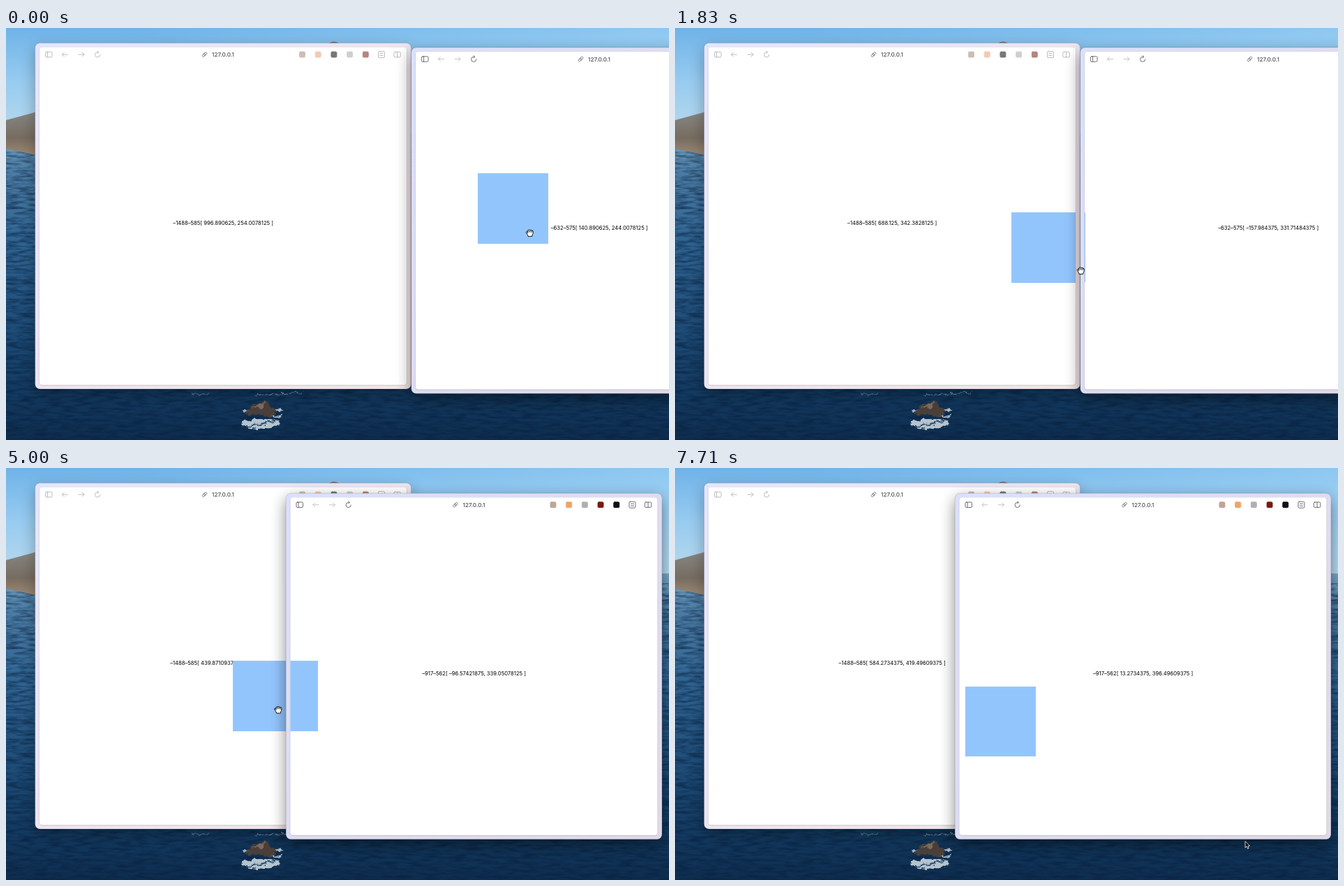
Write an HTML page that moves like this. It is 950 by 590 pixels and loops after 7.77 s.

```html
<!DOCTYPE html>
<html lang="en">
<head>
<meta charset="utf-8">
<title>One square, two windows</title>
<style>
  html, body { margin: 0; width: 100%; height: 100%; overflow: hidden; background: #0f2f52; }
  .stage { position: absolute; left: 0; top: 0; width: 950px; height: 590px; display: block; }
  #backdrop { will-change: transform; }
  text { font-family: Inter, "Open Sans", sans-serif; white-space: pre; }
  .readout { font-size: 7.65px; fill: #000; text-anchor: middle; }
  .address { font-size: 8.2px; font-weight: 500; fill: #505050; text-anchor: middle; }
  .icon { fill: none; stroke-width: .85; stroke-linecap: round; stroke-linejoin: round; }
  .square { fill: #93c5fd; shape-rendering: crispEdges; }
</style>
</head>
<body>
<svg id="backdrop" class="stage" viewBox="0 0 950 590">
  <defs>
    <linearGradient id="sky" x2="0" y2="1">
      <stop offset="0" stop-color="#6fb3e8"/>
      <stop offset=".5" stop-color="#97cbf0"/>
      <stop offset="1" stop-color="#b8d9ec"/>
    </linearGradient>
    <linearGradient id="haze">
      <stop offset=".2" stop-color="#b4e0fa" stop-opacity="0"/>
      <stop offset="1" stop-color="#b4e0fa" stop-opacity=".45"/>
    </linearGradient>
    <linearGradient id="sea" x2="0" y2="1">
      <stop offset="0" stop-color="#78a8c6"/>
      <stop offset=".12" stop-color="#4d7da5"/>
      <stop offset=".35" stop-color="#2f6492"/>
      <stop offset=".65" stop-color="#1d4b76"/>
      <stop offset=".85" stop-color="#133a60"/>
      <stop offset="1" stop-color="#0e2d4e"/>
    </linearGradient>
    <linearGradient id="cliff" x2="0" y2="1">
      <stop offset="0" stop-color="#858683"/>
      <stop offset=".6" stop-color="#776c60"/>
      <stop offset="1" stop-color="#9b8873"/>
    </linearGradient>
    <filter id="ripple" x="0" y="0" width="1" height="1" color-interpolation-filters="sRGB">
      <feTurbulence type="fractalNoise" baseFrequency=".05 .25" numOctaves="3" seed="7"/>
      <feColorMatrix values="0 0 0 0 .03  0 0 0 0 .12  0 0 0 0 .24  2 0 0 0 -.75"/>
    </filter>
    <filter id="rough" color-interpolation-filters="sRGB">
      <feTurbulence type="fractalNoise" baseFrequency=".15" numOctaves="3" seed="3"/>
      <feDisplacementMap in="SourceGraphic" scale="9" xChannelSelector="R" yChannelSelector="G"/>
    </filter>
  </defs>
  <rect width="950" height="152" fill="url(#sky)"/>
  <rect width="950" height="152" fill="url(#haze)"/>
  <path d="M462 22Q470 17 478 22Z" fill="#7d6a60"/>
  <rect y="151" width="950" height="439" fill="url(#sea)"/>
  <rect y="165" width="950" height="425" filter="url(#ripple)" opacity=".7"/>
  <path d="M0 132L44 120V182L0 173Z" fill="url(#cliff)"/>
  <g filter="url(#rough)">
    <path d="M267 524H290M355 526L425 522" fill="none" stroke="#b9ccd8" opacity=".6"/>
    <path d="M340 547L394 556M380 548L396 546" fill="none" stroke="#aebfca" stroke-width="2"/>
    <ellipse cx="365" cy="567" rx="27" ry="7" fill="#d3dee5" opacity=".85"/>
    <path d="M344 553L352 540L371 534L390 550L378 556Z" fill="#4b4039"/>
    <path d="M354 543L371 536L366 546Z" fill="#7d6c60"/>
    <path d="M344 571L384 563" fill="none" stroke="#2a4b68" stroke-width="2"/>
  </g>
</svg>

<svg id="scene" class="stage" viewBox="0 0 950 590">
  <defs>
    <linearGradient id="paleFrame" x2="1" y2="1">
      <stop offset="0" stop-color="#e5e5fb"/>
      <stop offset="1" stop-color="#f3e4e4"/>
    </linearGradient>
    <linearGradient id="blueFrame" x2="1" y2="1">
      <stop offset="0" stop-color="#dce0fb"/>
      <stop offset="1" stop-color="#e0d8e6"/>
    </linearGradient>
    <filter id="shadow" x="-20%" y="-20%" width="140%" height="140%">
      <feGaussianBlur stdDeviation="11"/>
    </filter>
  </defs>
  <g id="windows"></g>
  <path id="arrow" d="M0 0V9.2L2.1 7.3L3.6 10.6L5.2 9.9L3.8 6.7H6.5Z" fill="#000" stroke="#fff" stroke-width=".8"/>
  <g id="hand" stroke="#000" stroke-width=".9" stroke-linejoin="round" stroke-linecap="round">
    <path fill="#fff" d="M-5 -1Q-4.5 -3 -3 -2V-3.5Q-2 -5 -1 -3.8Q0 -5.4 1.2 -3.8Q2.4 -4.8 3.2 -3.2Q5 -3.5 5 -2Q5 1.5 3.5 3.5V5H-2.5V3.8Q-4.5 1.5 -5 -1Z"/>
    <path fill="none" d="M-3 -2V.3M-1 -3.8V-1.2M1.2 -3.8V-1.2M3.2 -3.2V-1"/>
  </g>
</svg>

<script>
const LOOP = 7770;
const TICK = 41.5;
const SCALE = 0.63;     // page pixels to stage pixels
const SIZE = 160 * SCALE;
const LEFT = { x: 48, y: 27.5 };
const RIGHT = { x: 587, y: 34 };
const BAR = 20.6;

const line = (d, color) => `<path class="icon" d="${d}" stroke="${color}"/>`;
const box = (x, w, h, color, fill = 'none') =>
  `<rect class="icon" x="${x - w / 2}" y="${10.5 - h / 2}" width="${w}" height="${h}" rx="1.5" stroke="${color}" style="fill:${fill}"/>`;
const splitBox = (x, bar, color) => box(x, 9.5, 7.5, color) + line(`M${bar} 7v7`, color);
const pill = angle =>
  `<rect class="icon" x="-2.6" y="-1.6" width="5.2" height="3.2" rx="1.6" stroke="#777" transform="translate(236.5 10.5) rotate(${angle}) translate(1.4 0)"/>`;

function toolbar(main, faint, badges) {
  return splitBox(13.3, 11.6, main)
    + line('M40.5 10.5h-8m3 -3l-3 3l3 3', faint)
    + line('M56 10.5h8m-3 -3l3 3l-3 3', faint)
    + line('M86.8 10.8A3.6 3.6 0 1 1 83.2 7.2H84.5m-1.4 -1.7l1.7 1.7l-1.7 1.7', main)
    + pill(-45) + pill(135)
    + '<text class="address" x="263" y="13.5">127.0.0.1</text>'
    + badges.map((color, i) => box(376.5 + 22.7 * i, 8, 8, color, color)).join('')
    + box(490, 9, 9, main) + line('M487.8 9h4.4m-4.4 3h4.4', main)
    + splitBox(512.6, 512.6, main);
}

function browserWindow(name, frame, shade, bar) {
  return `<g id="${name}">
    <rect x="-6" y="2" width="538" height="495" rx="8" opacity="${shade}" filter="url(#shadow)"/>
    <rect x="-6.3" y="-6" width="538.8" height="495.5" rx="7" fill="url(#${frame})" stroke="#000" stroke-opacity=".2" stroke-width=".6"/>
    <rect x="-.7" y="-.3" width="527.4" height="485" rx="4.5" opacity=".1"/>
    <rect width="526" height="483.6" rx="4" fill="#fff"/>
    ${bar}
    <svg y="${BAR}" width="526" height="463" overflow="hidden">
      <text class="readout" x="263.2" y="234.3"></text>
      <rect class="square" width="${SIZE}" height="${SIZE}"/>
    </svg>
  </g>`;
}

const dimBar = toolbar('#b2b2b2', '#b2b2b2', ['#cdbcb8', '#f5c9b4', '#777', '#cfcfcf', '#b5857d']);
const litBar = toolbar('#555', '#bcbcbc', ['#c0a497', '#f3a266', '#b0b0b0', '#7c1712', '#111']);

document.getElementById('windows').innerHTML =
  browserWindow('left', 'paleFrame', .3, dimBar) + browserWindow('right', 'blueFrame', .48, litBar);

const ease = u => (1 - Math.cos(Math.PI * Math.min(1, Math.max(0, u)))) / 2;
const mix = (a, b, u) => a.map((v, i) => v + (b[i] - v) * u);
const between = (tick, from, to) => tick >= from && tick <= to;

// Where the dragged square turns round, in page pixels of the right window.
const turns = [
  { at: 0, pos: [140.890625, 244.0078125] },
  { at: 17, pos: [-98.859375, 258.640625] },
  { at: 28, pos: [-380, 310] },
  { at: 43, pos: [-167.875, 332.3828125] },
  { at: 52, pos: [160.18359375, 310.23828125] },
  { at: 104, pos: [160.18359375, 310.23828125] },
  { at: 116, pos: [-180, 340] },
  { at: 128, pos: [153.7, 336.2] },
  { at: 137, pos: [-117.8, 366.5] },
  { at: 143, pos: [13.2734375, 396.49609375] }
];

function squareAt(tick) {
  const next = turns.findIndex(turn => turn.at > tick);
  if (next < 0) return turns[turns.length - 1].pos;
  if (next === 0) return turns[0].pos;
  const a = turns[next - 1], b = turns[next];
  return mix(a.pos, b.pos, ease((tick - a.at) / (b.at - a.at)));
}

const windowShiftAt = tick => mix([0, 0], [-285, 13], ease((tick - 86) / 9));

// Free moves of the pointer; each one rests at its end until it vanishes.
const flights = [
  { start: 63, end: 70, until: 70, from: [768, 338], to: [826, 36] },
  { start: 86, end: 95, until: 95, from: [900, 47], to: [720, 55] },
  { start: 95, end: 101, until: 103, from: [720, 55], to: [498.5, 332] },
  { start: 148, end: 152, until: 152, from: [434, 382], to: [700, 480] },
  { start: 181, end: 185, until: 999, from: [926, 586], to: [817, 534.5] }
];

const $ = selector => document.querySelector(selector);
const move = (node, [x, y]) => node.setAttribute('transform', `translate(${x.toFixed(2)} ${y.toFixed(2)})`);
const show = (node, shown) => node.setAttribute('visibility', shown ? 'visible' : 'hidden');
const snap = v => Math.round(v * 256) / 256;

function drawWindow(name, corner, screen, page) {
  const [x, y] = page.map(snap);
  move($('#' + name), corner);
  move($(`#${name} .square`), [x * SCALE, y * SCALE]);
  $(`#${name} .readout`).textContent =
    `${screen.map(Math.round).join('')}[ ${x}, ${y} ]`.replace(/-/g, '\u2013');
}

function drawPointer(tick, corner) {
  const firstDrag = tick < 63;
  const dragging = firstDrag || between(tick, 104, 147);
  const grip = firstDrag ? [76, 85] : [18, 70];
  const [x, y] = squareAt(tick + 1);    // the hand runs ahead of the square
  move($('#hand'), [corner[0] + x * SCALE + grip[0], corner[1] + BAR + y * SCALE + grip[1]]);
  show($('#hand'), dragging);

  const flight = flights.find(f => between(tick, f.start, f.until));
  show($('#arrow'), Boolean(flight));
  if (flight) {
    const progress = (tick - flight.start) / (flight.end - flight.start);
    move($('#arrow'), mix(flight.from, flight.to, ease(progress)));
  }
}

function render(time) {
  const tick = Math.floor((time % LOOP) / TICK);
  const [wx, wy] = windowShiftAt(tick);
  const corner = [RIGHT.x + wx * SCALE, RIGHT.y + wy * SCALE];

  // The left page hears of each move one tick late, and of the new gap when the drag resumes.
  const gap = tick < 104 ? [856, 10] : [571, 23];
  const late = squareAt(tick - 1).map((v, i) => v + gap[i]);
  drawWindow('left', [LEFT.x, LEFT.y], [-1488, -585], late);
  drawWindow('right', corner, [-632 + wx, -575 + wy], squareAt(tick));
  drawPointer(tick, corner);
}

const start = performance.now();
function loop() {
  render(performance.now() - start);
  requestAnimationFrame(loop);
}
loop();
</script>
</body>
</html>
```
